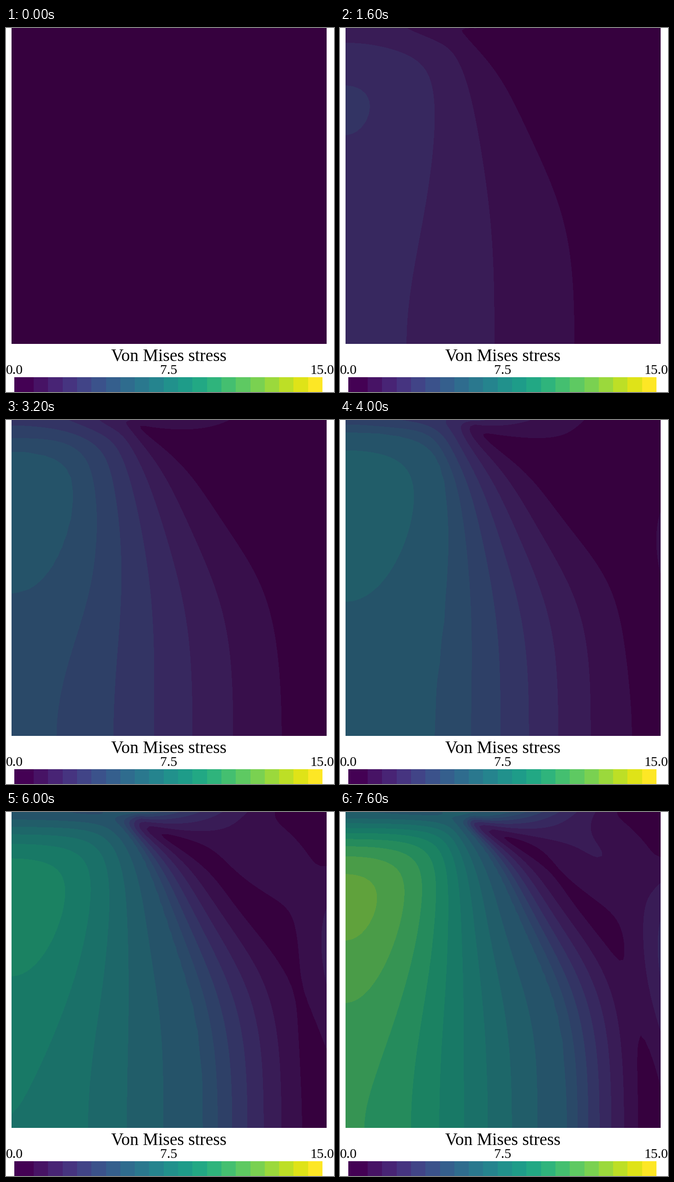
A matplotlib script that plays this animation: 711x787 px, repeating every 8000 ms.

```python
import numpy as np
import matplotlib.pyplot as plt
from matplotlib.animation import FuncAnimation
from matplotlib.patches import Rectangle

W, H, DPI = 711, 787, 100
LEFT, SIDE = 12, 683
FRAMES, INTERVAL = 20, 400

# Unit square in plane strain, pressed from above on its left part, with
# symmetry planes on the left and at the bottom. Stress is in colour bands.
N = 72                  # elements per side
NU = 0.3
HARDENING = 0.4         # relative to Young's modulus
YIELD = 6.8
LOAD_WIDTH = 0.4
PEAK_PER_STEP = 0.97    # highest elastic stress added by one load step
OFFSET = 0.2            # band k starts at the stress k - OFFSET

SHEAR = 1 / (2 * (1 + NU))
LAME = NU / ((1 + NU) * (1 - 2 * NU))
CORNERS = [(-1, -1), (1, -1), (-1, 1), (1, 1)]
ROW = 2 * (N + 1)       # unknowns in one row of nodes

x = np.linspace(0, 1, N + 1)
y = np.linspace(0, 1, N + 1) ** 1.3     # depth, finer near the loaded top
hx, hy = 1 / N, np.diff(y)


def strain_matrices():
    """Strain-displacement matrices for each element row and Gauss point."""
    b = np.zeros((N, 4, 3, 8))
    for p, (gx, gy) in enumerate(np.array(CORNERS) / np.sqrt(3)):
        for c, (cx, cy) in enumerate(CORNERS):
            dx = cx * (1 + cy * gy) / (2 * hx)
            dy = cy * (1 + cx * gx) / (2 * hy)
            b[:, p, 0, 2 * c] = b[:, p, 2, 2 * c + 1] = dx
            b[:, p, 1, 2 * c + 1] = b[:, p, 2, 2 * c] = dy
    return b.reshape(N, 12, 8)


B = strain_matrices()
BT = B.transpose(0, 2, 1)
BW = B * (hx * hy / 4)[:, None, None]


def factorise():
    """Block elimination of the elastic stiffness, one node row at a time."""
    d = np.array([[LAME + 2 * SHEAR, LAME, 0],
                  [LAME, LAME + 2 * SHEAR, 0],
                  [0, 0, SHEAR]])
    stiff = BW.transpose(0, 2, 1) @ np.kron(np.eye(4), d) @ B
    diag = np.zeros((N + 1, ROW, ROW))
    upper = np.zeros((N, ROW, ROW))
    base = np.r_[0:4, ROW:ROW + 4]
    for j in range(N):
        m = np.zeros((2 * ROW, 2 * ROW))
        for i in range(N):
            k = base + 2 * i
            m[np.ix_(k, k)] += stiff[j]
        diag[j] += m[:ROW, :ROW]
        diag[j + 1] += m[ROW:, ROW:]
        upper[j] = m[:ROW, ROW:]

    fixed = 1e5
    diag[:, 0, 0] += fixed              # no sideways motion on the left
    k = np.arange(1, ROW, 2)
    diag[N, k, k] += fixed              # no vertical motion at the bottom

    inverse = [np.linalg.inv(diag[0])]
    for j in range(N):
        schur = diag[j + 1] - upper[j].T @ inverse[j] @ upper[j]
        inverse.append(np.linalg.inv(schur))
    return inverse, upper


INVERSE, UPPER = factorise()
LOWER = [u.T @ inv for u, inv in zip(UPPER, INVERSE)]


def solve(force):
    """Elastic displacements for nodal forces."""
    r = force.reshape(N + 1, ROW).copy()
    for j in range(N):
        r[j + 1] -= LOWER[j] @ r[j]
    r[N] = INVERSE[N] @ r[N]
    for j in range(N - 1, -1, -1):
        r[j] = INVERSE[j] @ (r[j] - UPPER[j] @ r[j + 1])
    return r.reshape(N + 1, N + 1, 2)


def respond(u, plastic, hard):
    """Radial return: new plastic strain, its amount and von Mises stress."""
    nodes = np.concatenate([u[:-1, :-1], u[:-1, 1:], u[1:, :-1], u[1:, 1:]], -1)
    e = (nodes @ BT).reshape(N, N, 4, 3)
    mean = (e[..., 0] + e[..., 1]) / 3
    s = np.stack([e[..., 0] - mean, e[..., 1] - mean, e[..., 2] / 2], -1)
    s = 2 * SHEAR * (s - plastic)
    sx, sy, sxy = s[..., 0], s[..., 1], s[..., 2]
    q = np.sqrt(3 * (sx * sx + sy * sy + sx * sy + sxy * sxy))
    flow = np.maximum(q - YIELD - HARDENING * hard, 0) / (3 * SHEAR + HARDENING)
    rate = 1.5 * flow / np.maximum(q, 1e-9)
    return plastic + rate[..., None] * s, hard + flow, q - 3 * SHEAR * flow


def plastic_force(plastic):
    part = (2 * SHEAR * plastic).reshape(N, N, 12) @ BW
    f = np.zeros((N + 1, N + 1, 2))
    f[:-1, :-1] += part[..., 0:2]
    f[:-1, 1:] += part[..., 2:4]
    f[1:, :-1] += part[..., 4:6]
    f[1:, 1:] += part[..., 6:8]
    return f


def simulate():
    """Von Mises stress in the elements after every load step."""
    plastic, hard = np.zeros((N, N, 4, 3)), np.zeros((N, N, 4))
    load = np.zeros((N + 1, N + 1, 2))
    load[0, :, 1] = hx * np.maximum(1 - (x / LOAD_WIDTH) ** 2, 0)
    load[0, 0, 1] /= 2
    first = solve(load)
    scale = PEAK_PER_STEP / respond(first, plastic, hard)[2].mean(-1).max()
    load, first = load * scale, first * scale

    u = np.zeros_like(first)
    fields = [np.zeros((N, N))]
    for step in range(1, FRAMES):
        u = u + first
        for _ in range(24):
            trial = respond(u, plastic, hard)[0]
            change = solve(step * load + plastic_force(trial)) - u
            u = u + 1.6 * change        # over-relaxed for speed
            if abs(change).max() < 1e-4 * abs(u).max():
                break
        plastic, hard, mises = respond(u, plastic, hard)
        fields.append(mises.mean(-1))
    return fields


def extend(f, mid):
    """Continue rows of f linearly from the element centres to both edges."""
    head = f[0] + (f[0] - f[1]) * mid[0] / (mid[1] - mid[0])
    tail = f[-1] + (f[-1] - f[-2]) * (1 - mid[-1]) / (mid[-1] - mid[-2])
    return np.vstack([head, f, tail])


mid_x, mid_y = (x[1:] + x[:-1]) / 2, (y[1:] + y[:-1]) / 2
fields = [extend(extend(f, mid_y).T, mid_x).T for f in simulate()]
plot_x = LEFT + SIDE * np.r_[0, mid_x, 1]
plot_y = SIDE * np.r_[0, mid_y, 1]

fig = plt.figure(figsize=(W / DPI, H / DPI), dpi=DPI, facecolor="white")
ax = fig.add_axes([0, 0, 1, 1])
ax.set_xlim(0, W)
ax.set_ylim(H, 0)
ax.axis("off")

palette = plt.get_cmap("viridis")(np.linspace(0, 1, 21))[:, :3]
shaded = palette * (0.79, 0.775, 0.74)      # the plate is lit, the bar is not
levels = [-1000, *(np.arange(1, 21) - OFFSET), 1000]


def label(cx, base, text, px):
    ax.text(cx, base, text, family="Liberation Serif", size=px * 72 / DPI,
            ha="center", va="baseline", color="black")


label(353.5, 720, "Von Mises stress", 37.3)
for cx, text in ((18.5, "0.0"), (352.5, "7.5"), (685.5, "15.0")):
    label(cx, 748, text, 29.5)

edges = [18, *(60 + 31.3 * np.arange(21))]
for a, b, color in zip(edges, edges[1:], palette):
    ax.add_patch(Rectangle((a, 755), b - a, 32, color=color, lw=0,
                           antialiased=False))

plate = []


def update(step):
    while plate:
        plate.pop().remove()
    plate.append(ax.contourf(plot_x, plot_y, fields[step], levels=levels,
                             colors=shaded, antialiased=False))
    return plate


anim = FuncAnimation(fig, update, frames=FRAMES, interval=INTERVAL,
                     repeat=True, repeat_delay=0, blit=False)
plt.show()
```
